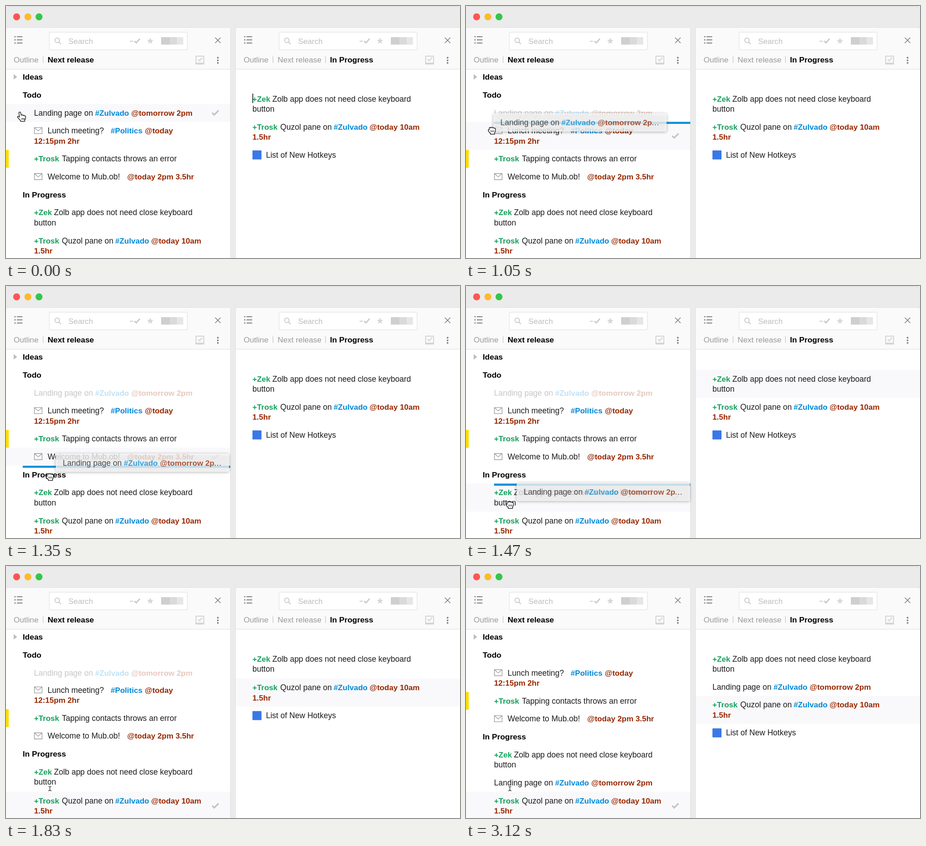
An HTML page with a canvas for the animation above (3.33 s loop, 1004x558 px).

```html
<!DOCTYPE html>
<html lang="en">
<head>
<meta charset="utf-8">
<title>Dragging a task between lists</title>
<style>
html, body { margin: 0; width: 100%; height: 100%; overflow: hidden; background: #fff; }
canvas { display: block; }
</style>
</head>
<body>
<canvas id="stage" width="1004" height="558"></canvas>
<script>
const ctx = document.getElementById('stage').getContext('2d');
const LOOP = 3330, STEP = 30, LAG = 55;
const DRAG_START = 960, DROP = 1800, SLIDE = 240;
const LINE_HEIGHT = 22.4, ROW_PADDING = 17.3;

// style: colour, weight, size
const STYLES = {
  text: ['#1c1c1c', 400, 17.5],
  head: ['#000', 700, 17.4],
  muted: ['#999', 400, 17.3],
  hint: ['#bdbdbd', 400, 17.1],
  who: ['#17a05d', 700, 17.1],
  tag: ['#0288d6', 700, 17.1],
  date: ['#982700', 700, 17.1]
};

// run: style, x offset, text, line
const heading = title => ({ x: 37, lines: 1, runs: [['head', 0, title]] });
const task = (lines, runs, icon) => ({ x: 62, lines, runs, icon });

const ideas = { ...heading('Ideas'), icon: 'arrow' };
const todo = heading('Todo');
const landing = task(1, [['text', 0, 'Landing page on'], ['tag', 135, '#Zulvado'], ['date', 215, '@tomorrow 2pm']]);
const lunch = task(2, [['text', 30, 'Lunch meeting?'], ['tag', 169.5, '#Politics'], ['date', 245, '@today'],
  ['date', 0, '12:15pm 2hr', 1]], 'mail');
const tapping = task(1, [['who', 0, '+Trosk'], ['text', 61.6, 'Tapping contacts throws an error']], 'flag');
const welcome = task(1, [['text', 30, 'Welcome to Mub.ob!'], ['date', 206, '@today 2pm 3.5hr']], 'mail');
const progress = heading('In Progress');
const tablet = task(2, [['who', 0, '+Zek'], ['text', 44, 'Zolb app does not need close keyboard'],
  ['text', 0, 'button', 1]]);
const pane = task(2, [['who', 0, '+Trosk'], ['text', 61.6, 'Quzol pane on'], ['tag', 179.5, '#Zulvado'],
  ['date', 259, '@today 10am'], ['date', 0, '1.5hr', 1]]);
const hotkeys = task(1, [['text', 30, 'List of New Hotkeys']], 'doc');
const cardRuns = [...landing.runs.slice(0, 2), ['date', 215, '@tomorrow 2p'], ['text', 334, '…']];

// time, x, y
const POINTER = [[0, 34, 245], [870, 34, 245], [900, 37, 248], [1000, 46, 260], [1115, 72, 295],
  [1170, 82, 325], [1295, 95, 393], [1350, 97, 422], [1410, 97, 455], [1470, 97, 484], [1530, 97, 501]];

const HAND = new Path2D('M-5.5-8.5C-5.5-11-2-11-1.5-8.5L-.3-3C.5-4.5 2.8-4.3 3.2-2.5C4-3.8 6-3.4 6.4-1.8' +
  'C7.4-2.6 9.2-2 9.3 0C9.8 3 9 5.5 7.5 7.5L7.3 10.5H-1.5L-2 8.5C-4 6.5-6 4.5-8 2C-9.8 0-7.5-1.6-5.8-.3L-4 1Z');
const FIST = new Path2D('M-6-4C-6-7-3-7-2.6-5C-2-7.5 1-7.2 1.4-5C2-6.8 4.6-6.4 4.8-4.2C6-5.5 8-4.5 8-2.5' +
  'C8.5 1 7.5 3.5 6 6V8.5H-3.5V6.5C-6 4-9 2-8-.5C-7.5-1.5-6.5-1.2-6-.8Z');

function pointerAt(t) {
  const i = POINTER.findIndex(key => key[0] > t);
  if (i < 0) return { x: 97, y: 501 };
  const [t0, x0, y0] = POINTER[i - 1], [t1, x1, y1] = POINTER[i];
  const k = (t - t0) / (t1 - t0);
  return { x: x0 + (x1 - x0) * k, y: y0 + (y1 - y0) * k };
}

function rect(x, y, w, h, color, radius = 0) {
  ctx.fillStyle = color;
  ctx.beginPath();
  ctx.roundRect(x, y, w, h, radius);
  ctx.fill();
}

function dot(x, y, r, color) {
  ctx.fillStyle = color;
  ctx.beginPath();
  ctx.arc(x, y, r, 0, 7);
  ctx.fill();
}

function stroke(path, color, width = 1.5) {
  ctx.strokeStyle = color;
  ctx.lineWidth = width;
  ctx.stroke(new Path2D(path));
}

function fill(path, color) {
  ctx.fillStyle = color;
  ctx.fill(new Path2D(path));
}

// y is the middle of the capital letters
function label(style, x, y, str) {
  const [color, weight, size] = STYLES[style];
  ctx.font = `${weight} ${size}px "Liberation Sans", Arial, sans-serif`;
  ctx.fillStyle = color;
  ctx.fillText(str, x, y + 6);
}

function drawRuns(runs, x, y) {
  for (const [style, dx, str, line = 0] of runs) label(style, x + dx, y + line * LINE_HEIGHT, str);
}

function drawIcon(icon, x, y) {
  if (icon === 'arrow') fill(`M17 ${y - 6}l7.5 6l-7.5 6z`, '#bbb');
  if (icon === 'mail') stroke(`M${x + .7} ${y - 7}h17v13.5h-17zl8.5 7.5l8.5-7.5`, '#999', 1.3);
  if (icon === 'flag') rect(0, y - 19.8, 6, 39.7, '#ffdc00');
  if (icon === 'doc') rect(x, y - 10, 20, 20, '#3b78e7', 1);
}

function drawHeader(x, crumbs) {
  ctx.save();
  ctx.translate(x, 0);
  rect(0, 48, 496, 520, '#fff', 5);
  rect(0, 48, 496, 92, '#fafafa', [5, 5, 0, 0]);
  rect(0, 139.5, 496, 1, '#dedede');
  for (const y of [68, 75, 82]) {
    rect(18.5, y - 1.2, 3, 2.4, '#808080');
    rect(24, y - 1, 12.5, 2, '#808080');
  }
  rect(95.5, 57.5, 306, 40, '#dcdcdc', 3);
  rect(96.5, 58.5, 304, 38, '#fff', 2);
  stroke('M118.2 76a5 5 0 1 0-10 0a5 5 0 1 0 10 0M117 80l4.5 4.5', '#cacaca', 2);
  label('hint', 138, 78, 'Search');
  stroke('M274 78h7', '#ccc', 2);
  stroke('M284 77.5l4 4l8-9', '#ccc', 3);
  fill('M319 70l2 4.8l5.2.4l-4 3.4l1.3 5l-4.5-2.7l-4.5 2.7l1.3-5l-4-3.4l5.2-.4z', '#d8d8d8');
  rect(343, 69, 19, 16.5, '#cfcfcf');
  rect(362, 69, 16, 16.5, '#dadada');
  rect(378, 69, 14, 16.5, '#e6e6e6');
  stroke('M462.5 70l12 12m0-12l-12 12', '#808080', 1.7);
  stroke('M420 111h17.5v17.5h-17.5zM420 126.5h17.5', '#d3d3d3', 2);
  stroke('M424.5 118l3.5 3.5l6-7', '#d3d3d3', 2.2);
  for (const y of [114.5, 120.3, 126]) dot(468.5, y, 1.9, '#808080');
  for (const [style, dx, str] of crumbs) {
    if (dx > 20) rect(dx - 10.5, 111, 1, 15, '#bbb');
    label(style, dx, 119, str);
  }
  ctx.restore();
}

function layout(rows, top) {
  return rows.map(({ item, open = 1, alpha = 1 }) => {
    const h = (ROW_PADDING + item.lines * LINE_HEIGHT) * open;
    const row = { item, open, alpha, y: top, h };
    top += h;
    return row;
  });
}

function drawRow(row, left, indent, hovered) {
  if (row.h < .5) return;
  ctx.save();
  ctx.beginPath();
  ctx.rect(left, row.y, 496, row.h);
  if (row.open < 1) ctx.clip();
  if (hovered) rect(left, row.y, 496, row.h, '#f9f9fb');
  ctx.globalAlpha = row.alpha;
  drawIcon(row.item.icon, indent, row.y + 19.8);
  drawRuns(row.item.runs, indent, row.y + 19.8);
  ctx.restore();
}

function drawCard(x, y) {
  ctx.save();
  ctx.globalAlpha = .77;
  ctx.shadowColor = 'rgba(0,0,0,.4)';
  ctx.shadowBlur = 6;
  ctx.shadowOffsetY = 1;
  rect(x, y, 383, 40.5, '#fff', 4);
  ctx.shadowColor = 'transparent';
  drawRuns(cardRuns, x + 15.5, y + 21);
  ctx.restore();
}

function drawHand(shape, fingers, { x, y }) {
  ctx.save();
  ctx.translate(x, y);
  ctx.lineJoin = 'round';
  ctx.fillStyle = '#fff';
  ctx.fill(shape);
  ctx.strokeStyle = '#222';
  ctx.lineWidth = 1.5;
  ctx.stroke(shape);
  stroke(fingers, '#222', 1.2);
  ctx.restore();
}

function drawBeam(t) {
  const short = t >= 2190 && t < 2430 || t >= 2700 && t < 2910;
  stroke(short
    ? 'M93.5 489.7q3.5 0 3.5 2.5q0-2.5 3.5-2.5M97 491v7.5'
    : 'M94 488.3q3 0 3 2q0-2 3-2M97 490v6M93.5 497.7q3.5 0 3.5-2.5q0 2.5 3.5 2.5', '#444', 1.4);
}

function draw(t) {
  const pointer = pointerAt(t), trail = pointerAt(Math.max(0, t - LAG));
  const dragging = t >= DRAG_START && t < DROP;
  const k = Math.min(1, Math.max(0, (t - DROP) / SLIDE));
  const slide = .5 - Math.cos(k * Math.PI) / 2;
  const closing = { item: landing, open: 1 - slide, alpha: t < DRAG_START ? 1 : .25 };
  const opening = { item: landing, open: slide };
  const wrap = item => ({ item });

  const left = layout([wrap(ideas), wrap(todo), closing,
    ...[lunch, tapping, welcome, progress, tablet].map(wrap), opening, wrap(pane)], 137.3);
  const right = layout([wrap(tablet), opening, wrap(pane), wrap(hotkeys)], 185.7);
  const over = left.findIndex(row => trail.y >= row.y && trail.y < row.y + row.h);
  const hover = left[over];

  rect(0, 0, 1004, 558, '#fff');
  rect(0, 0, 1004, 568, '#d4d4d4', 6);
  rect(0, 1, 1004, 567, '#ebebeb', 6);
  dot(23.5, 24, 7.7, '#fc5652');
  dot(48.5, 24, 7.7, '#fcbb2d');
  dot(73, 24, 7.7, '#34c648');
  rect(-1, 47, 498, 520, '#dedede', 6);
  rect(507, 47, 498, 520, '#dedede', 6);
  drawHeader(0, [['muted', 17, 'Outline'], ['head', 92, 'Next release']]);
  drawHeader(508, [['muted', 17.5, 'Outline'], ['muted', 92.5, 'Next release'], ['head', 208.5, 'In Progress']]);

  for (const row of left) drawRow(row, 0, row.item.x, row === hover);
  for (const row of right) drawRow(row, 508, 545, row.item === hover.item);

  const middle = hover.y + hover.h / 2;
  stroke(`M456 ${middle}l4.5 4.5l9.5-9.5`, '#c4c4c4', 3.4);
  if (t < 390) rect(545, 194, 1.5, 21, `rgba(0,0,0,${t < 330 ? 1 : .4})`);

  if (dragging) {
    const after = trail.y > middle;
    if (hover.item !== landing) {
      const next = left[over + after] || hover;
      rect(next.item.x, after ? hover.y + hover.h : hover.y, 496 - next.item.x, 4.7, '#078fdb');
    }
    drawCard(trail.x + 15, trail.y - 22);
    drawHand(FIST, 'M-2 0v4M1 0v4M4 0v4', pointer);
  } else if (t < DROP) {
    drawHand(HAND, 'M1 3v4M3.7 3v4M6.3 3v4', pointer);
  } else {
    drawBeam(t);
  }
}

const start = performance.now();
function tick() {
  const t = (performance.now() - start) % LOOP;
  draw(Math.floor(t / STEP) * STEP);
  requestAnimationFrame(tick);
}
tick();
</script>
</body>
</html>
```
